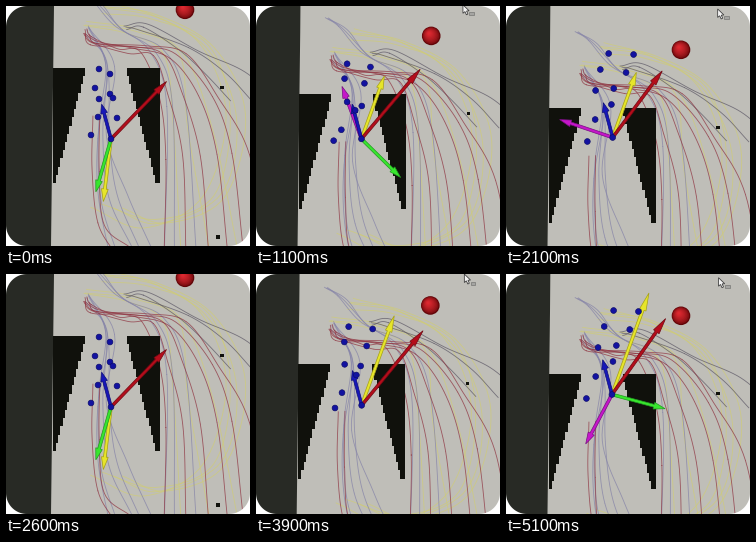
Recreate the animation shown at these times as a matplotlib script. Size 244 px wide and 240 px high, loop 5.2 s.

```python
import numpy as np
import matplotlib.pyplot as plt
from matplotlib.animation import FuncAnimation
from matplotlib.patches import Circle, Polygon, Rectangle
from matplotlib.transforms import Affine2D

W, H, DPI = 244, 240, 100
PX = 72 / DPI
CYCLE = 26
KEYS = [0, 7, 16, 19, 25]

# Joints relative to the base: at rest, crouched, stretched
REST = [(-12, -70), (-1, -65), (-16, -51), (-1, -45), (-12, -40),
        (2, -41), (6, -21), (-13, -22), (-20, -4)]
CROUCH = [(-17, -68), (5, -63), (-16, -54), (-1, -48), (-9, -29),
          (3, -20), (-8, -25), (-21, -2), (-30, 0)]
STRETCH = [(-11, -84), (14, -83), (-18, -68), (8, -65), (-21, -47),
           (-3, -49), (-4, -33), (-19, -18), (-25, 4)]

# colour, line count, sideways spread at the far end, route
TRAILS = [
    ("#cfcc78", 4, 16, [(100, 2), (150, 10), (205, 42), (228, 110),
                        (210, 190), (150, 218), (100, 200)]),
    ("#cfcc78", 3, 30, [(82, 16), (130, 28), (168, 48), (185, 120),
                        (205, 245)]),
    ("#8583a8", 3, 14, [(75, -14), (92, -2), (114, 22), (150, 46),
                        (168, 100), (172, 245)]),
    ("#8583a8", 5, 22, [(80, 22), (100, 60), (99, 130), (103, 190),
                        (125, 245)]),
    ("#5d5866", 3, 26, [(118, 21), (140, 20), (180, 42), (220, 66),
                        (250, 95)]),
    ("#8f3441", 6, 50, [(78, 27), (88, 36), (125, 42), (158, 50),
                        (182, 90), (200, 150), (210, 245)]),
    ("#8f3441", 2, 12, [(90, 110), (91, 165), (97, 215), (115, 245)]),
]

rng = np.random.default_rng(4)


def key(k, *values):
    return np.interp(k, KEYS, values)


def polar(length, degrees):
    a = np.radians(degrees)
    return length * np.array([np.cos(a), np.sin(a)])


def smooth(points, n=12):
    """Catmull-Rom curve through the points."""
    p = np.array(points, float)
    p = np.vstack([2 * p[0] - p[1], p, 2 * p[-1] - p[-2]])
    t = np.linspace(0, 1, n)[:, None]
    return np.vstack([
        0.5 * (2 * b + (c - a) * t + (2 * a - 5 * b + 4 * c - d) * t**2
               + (3 * b - a - 3 * c + d) * t**3)
        for a, b, c, d in zip(p, p[1:], p[2:], p[3:])])


def stairs(x_top, x_end, x_wall, top=62, height=115, steps=14):
    """Block with a straight wall and one stepped side."""
    xs = np.linspace(x_top, x_end, steps)
    ys = np.linspace(top, top + height, steps + 1)
    side = np.column_stack([np.repeat(xs, 2), np.repeat(ys, 2)[1:-1]])
    return np.vstack([[(x_wall, top)], side, [(x_wall, top + height)]])


def arrow_shape(start, vec, width=2.8):
    length = np.hypot(*vec)
    u = vec / length
    n = np.array([-u[1], u[0]])
    head = min(0.12 * length + 5, 0.7 * length)
    neck, a, b = start + vec - u * head, n * width / 2, n * 3.4
    return np.array([start - a, neck - a, neck - b, start + vec,
                     neck + b, neck + a, start + a])


def camera(k):
    return key(k, 0, -2, -6, -4, -4), key(k, 0, 23, 30, 41, 38)


def base(k):
    return np.array([key(k, 105, 105, 106, 107, 106),
                     key(k, 133, 136, 129, 137, 120.5)])


def joints(k):
    """Crouch first, then stretch while leaning to the right."""
    crouch = np.clip(k / 7, 0, 1)
    stretch = np.clip((k - 7) / 9, 0, 1)
    p = np.array(REST) * (1 - crouch) + np.array(CROUCH) * crouch
    p = p * (1 - stretch) + np.array(STRETCH) * stretch
    p[:, 0] -= p[:, 1] * np.interp(k, [16, 25], [0, 0.15])
    return p + base(k)


def vectors(k):
    """Arrow vectors; green and magenta turn at fixed length and blink."""
    out = {
        "red": polar(key(k, 80, 80, 105, 78, 93), -46 - 0.35 * k),
        "blue": polar(36, -105),
        "yellow": polar(key(k, 63, 10, 138, 50, 108),
                        97 if k < 8 else -70),
    }
    if not 11 < k < 22:
        out["green"] = polar(55, np.interp(k, [0, 7, 25], [106, 53, 15]))
    if 3 < k < 12 or k > 16:
        out["magenta"] = polar(56, np.interp(k, [7, 19, 25],
                                             [-105, -121, -242]))
    return out


fig = plt.figure(figsize=(W / DPI, H / DPI), dpi=DPI, facecolor="white")
ax = fig.add_axes([0, 0, 1, 1])
ax.set_xlim(0, W)
ax.set_ylim(H, 0)
ax.axis("off")

shift = Affine2D()
world = shift + ax.transData


def add(patch, z, moving=False):
    patch.set_zorder(z)
    ax.add_patch(patch)
    if moving:
        patch.set_transform(world)
    return patch


add(Rectangle((0, 0), W, H, color="#bfbeb8", lw=0), 0)

for color, count, spread, route in TRAILS:
    grow = np.linspace(0.08, 1, len(route))
    for side in np.linspace(-1, 1, count):
        pts = np.array(route) + rng.normal(0, 2.5, (len(route), 2))
        pts[:, 0] += side * spread * grow**1.5
        x, y = smooth(pts).T
        ax.plot(x, y, color=color, alpha=0.75, lw=0.85 * PX,
                transform=world, zorder=2)

# Scene that slides with the camera
BLACK = "#10110c"
add(Polygon([(-60, -60), (48.5, -60), (48, 0), (45, 240), (45, 300),
             (-60, 300)], color="#282a25", lw=0), 3, True)
add(Polygon(stairs(79, 50, 47), color=BLACK, lw=0), 4, True)
add(Polygon(stairs(121, 149, 154), color=BLACK, lw=0), 4, True)
for x, y in [(216, 81.5), (212, 231)]:
    add(Rectangle((x - 1.6, y - 1.6), 3.2, 3.2, color=BLACK, lw=0), 4, True)

# Shaded ball, lit from the upper left
DARK, LIT = np.array([0.38, 0.02, 0.03]), np.array([0.86, 0.16, 0.19])
for t in np.linspace(0, 1, 9):
    add(Circle((179 - 2.2 * t, 3.8 - 2.6 * t), 9.3 - 7.8 * t,
               color=DARK + (LIT - DARK) * t**0.6, lw=0), 5, True)

PALETTE = {"yellow": ("#e6e52a", "#a5a018"), "green": ("#38e62e", "#219a20"),
           "magenta": ("#c516c9", "#780f83"), "red": ("#b40d1b", "#700812"),
           "blue": ("#1717b8", "#0c0c78")}
arrows = {name: add(Polygon(np.zeros((3, 2)), fc=face, ec=edge, lw=0.7 * PX,
                            joinstyle="miter"), 6 + z)
          for z, (name, (face, edge)) in enumerate(PALETTE.items())}
dots = [add(Circle((0, 0), 2.9, fc="#1212a0", ec="#0a0a66", lw=0.6 * PX), 12)
        for _ in range(len(REST) + 1)]

POINTER = np.array([(0, 0), (0, 8.5), (2, 6.8), (3.5, 10), (5, 9.2),
                    (3.6, 6.2), (6.2, 6)])
pointer = add(Polygon(POINTER, fc="#f4f4f4", ec="#3c3c3c", lw=0.8 * PX), 14)
badge = add(Rectangle((0, 0), 4.5, 3, fc="#a5a5a2", ec="#6e6e6c",
                      lw=0.6 * PX), 14)

# White wedges round the stage corners
R = 21
arc = R - R * np.array([polar(1, d) for d in np.linspace(0, 90, 20)])
wedge = np.vstack([[(-1, -1), (R, -1)], arc[::-1], [(-1, R)]])
for cx, sx in [(0, 1), (W, -1)]:
    for cy, sy in [(0, 1), (H, -1)]:
        add(Polygon(wedge * (sx, sy) + (cx, cy), color="white", lw=0), 20)


def draw(i):
    k = i % CYCLE
    shift.clear().translate(*camera(k))
    start = base(k)
    shown = vectors(k)
    for name, arrow in arrows.items():
        arrow.set_visible(name in shown)
        if name in shown:
            arrow.set_xy(arrow_shape(start, shown[name]))
    for dot, p in zip(dots, [*joints(k), start]):
        dot.center = tuple(p)
    settle = 1 - np.exp(-k / 9)
    tip = np.array([190, -16]) + settle * np.array([24, 21])
    pointer.set_xy(POINTER + tip)
    badge.set_xy(tip + (6.5, 7.5))
    return []


anim = FuncAnimation(fig, draw, frames=2 * CYCLE, interval=100,
                     repeat=True, repeat_delay=0, blit=False)
plt.show()
```
